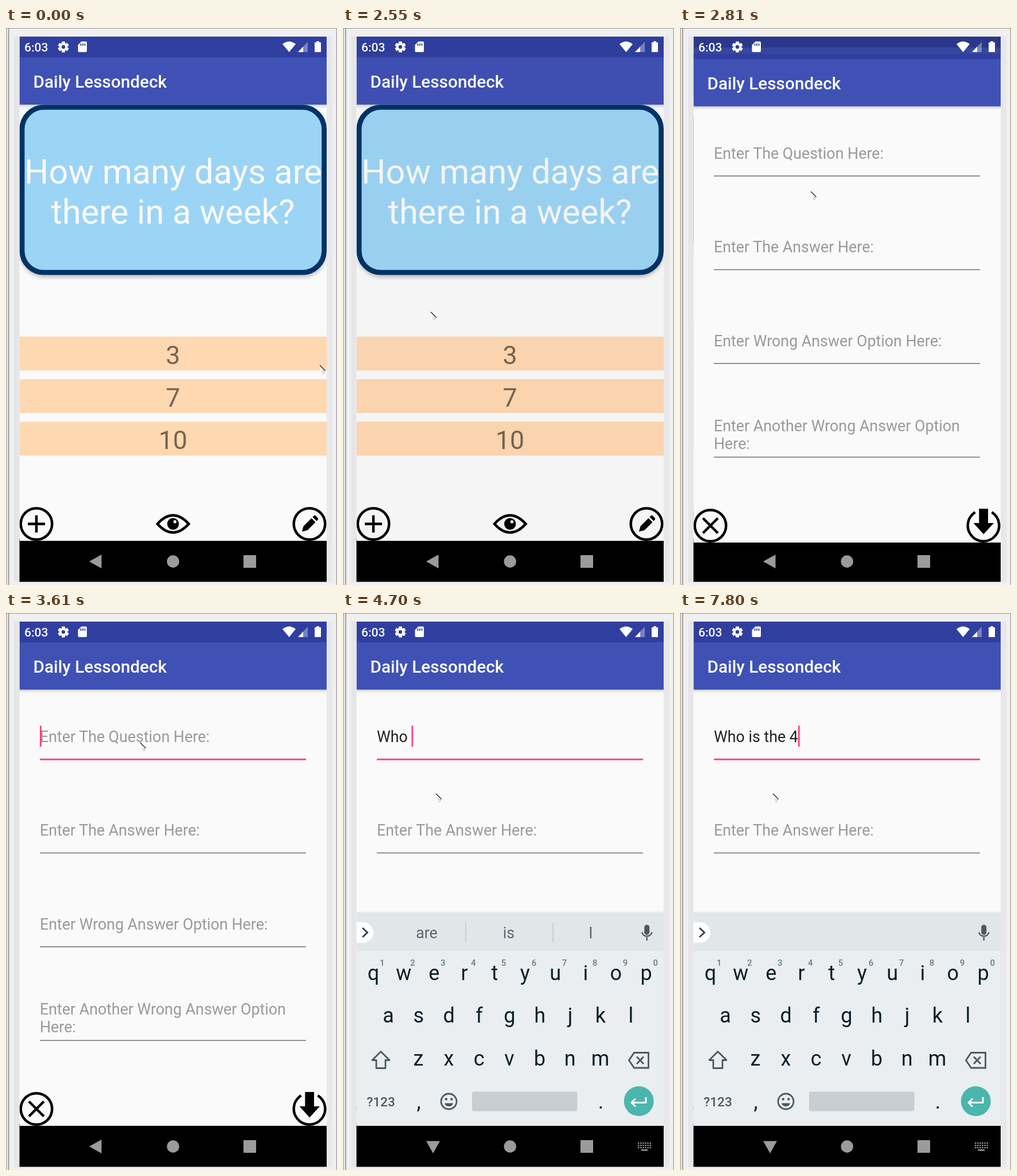
Recreate the animation shown at these times as an HTML page. Size 577x971 px, loop 8000 ms.

```html
<!DOCTYPE html>
<html lang="en">
<head>
<meta charset="utf-8">
<title>Flashcard app</title>
<style>
html, body { margin: 0; width: 100%; height: 100%; overflow: hidden; background: #f0f0f1; }
svg { display: block; font-family: Roboto, "Noto Sans", sans-serif; }
.mid { text-anchor: middle; }
.bold { font-weight: 500; }
.line { fill: none; stroke: #000; stroke-width: 4.5; }
.hint { font-size: 26.8px; fill: #9a9a9a; }
.key { font-size: 36px; fill: #0c1f28; text-anchor: middle; }
.tool { fill: none; stroke: #4b5960; stroke-width: 2.8; }
.word { font-size: 26.8px; fill: #5c686e; text-anchor: middle; }
</style>
</head>
<body>
<svg id="stage" width="577" height="971" viewBox="0 0 577 971"></svg>
<script>
const stage = document.getElementById('stage');
const LOOP = 8000;
const TEXT_X = 59;

const rect = (x, y, w, h, fill, extra = '') =>
  `<rect x="${x}" y="${y}" width="${w}" height="${h}" fill="${fill}" ${extra}/>`;
const text = (x, y, cls, content, extra = '') =>
  `<text x="${x}" y="${y}" class="${cls}" ${extra}>${content}</text>`;
const path = (d, extra = '') => `<path d="${d}" ${extra}/>`;
const ring = (x, y) => `<circle cx="${x}" cy="${y}" r="27.3" class="line" stroke-width="5"/>`;

const header = () =>
  rect(23.5, 134, 535.5, 6, 'url(#shade)') +
  rect(23.5, 15, 535.5, 36, '#303f9f') +
  rect(23.5, 51, 535.5, 82.7, '#3f51b5') +
  text(47.5, 103.5, 'bold', 'Daily Lessondeck', 'font-size="29.75" fill="#fff"');

function cardScreen() {
  const options = ['3', '7', '10'].map((label, i) =>
    rect(23.5, 538 + 74.2 * i, 535.5, 59, '#fed8b1') +
    text(291, 585.5 + 74.2 * i, 'mid', label, 'font-size="44.6" fill="#776451"')).join('');
  return rect(23.5, 15, 535.5, 879, '#fafafa') + header() +
    rect(24, 137, 535, 298, '#000', 'rx="43" opacity=".22" filter="url(#blur)"') +
    rect(28, 138.2, 526.6, 288, '#9cd4f5', 'rx="38" stroke="#036" stroke-width="8.8"') +
    text(291.5, 270.8, 'mid', 'How many days are', 'font-size="59.5" fill="#fafafa"') +
    text(291, 340.5, 'mid', 'there in a week?', 'font-size="59.5" fill="#fafafa"') +
    options + ring(53, 864.5) +
    path('M38 864.5H68M53 849.5V879.5', 'class="line"') +
    path('M264 864.5Q277 849.5 291.2 849.5T318.500 864.500Q305 879.500 291.200 879.500T264 864.500Z', 'class="line"') +
    '<circle cx="291.200" cy="864.500" r="10.200"/><circle cx="294.500" cy="860.800" r="2.700" fill="#fafafa"/>' +
    ring(529, 864.5) +
    path('M516 878L518.500 868.500L532.500 854.500L539.500 861.500L525.500 875.500ZM534.500 852.500L537 850Q538.500 849 540 850.500L543.500 854Q545 855.500 543.500 857.500L541.500 859.500Z');
}

function formScreen() {
  const hints = ['Enter The Question Here:', 'Enter The Answer Here:', 'Enter Wrong Answer Option Here:'];
  const fields = hints.map((label, i) =>
    text(TEXT_X, 225 + 163.4 * i, 'hint', label, i ? '' : 'id="hint"')).join('');
  const rules = [1, 2, 3].map(i => rect(59, 254.2 + 163.4 * i, 464, 1.5, '#707070')).join('');
  return rect(23.5, 15, 535.5, 879, '#fafafa') + header() + fields + rules +
    text(TEXT_X, 699.5, 'hint', 'Enter Another Wrong Answer Option') +
    text(TEXT_X, 731, 'hint', 'Here:') +
    '<rect id="focus" x="59" width="464"/>' +
    text(TEXT_X, 225, '', '', 'id="typed" font-size="26.8" fill="#212121"') +
    rect(59, 196.5, 2.8, 36.5, '#ff4081', 'id="caret"') +
    ring(53, 864.5) + path('M40 851.500L66 877.500M66 851.500L40 877.500', 'class="line"') +
    path('M514.500 841.200A27.300 27.300 0 1 0 543.500 841.200', 'class="line"') +
    path('M521.300 835H537V860H547L529.200 879.500L511.500 860H521.300Z');
}

function keyboard() {
  const row = (letters, x, y) => [...letters].map((c, i) => text(x + 52.85 * i, y, 'key', c)).join('');
  const digits = [...'1234567890'].map((c, i) =>
    text(68.3 + 52.95 * i, 615, 'mid bold', c, 'font-size="15" fill="#6e7a80"')).join('');
  return rect(23.5, 519, 535.5, 5, 'url(#rise)') +
    rect(23.5, 523.5, 535.5, 66, '#e1e6e8') + rect(23.5, 589, 535.5, 305, '#eaeef1') +
    path('M23.500 539H35A18 18 0 0 1 35 575H23.500Z', 'fill="#fff"') +
    path('M34 549L42.500 557L34 565', 'class="tool" style="stroke:#2f3f47"') +
    '<g id="words">' + rect(213.3, 540, 1.4, 34, '#c0c6c9') + rect(365.3, 540, 1.4, 34, '#c0c6c9') +
    [146, 289, 432].map(x => text(x, 567, 'word', '')).join('') + '</g>' +
    rect(525.2, 543.5, 9, 17.5, '#4b5960', 'rx="4.500"') +
    path('M521 556.500A9 9 0 0 0 538.500 556.500M529.700 565V571', 'class="tool" style="stroke-width:2.4"') +
    digits + row('qwertyuiop', 53, 640) + row('asdfghjkl', 79, 714) + row('zxcvbnm', 131.5, 789) +
    path('M66 764.500L81 779.500H74V793.500H58V779.500H51Z', 'class="tool" stroke-linejoin="round"') +
    path('M507.500 766.500H532.500V793H507.500L498.500 779.700ZM512 773.500L524 786M524 773.500L512 786', 'class="tool"') +
    text(66, 859.5, 'mid bold', '?123', 'font-size="22.6" fill="#4b5960"') +
    text(132, 864, 'key', ',') + text(449.5, 864, 'key', '.') +
    '<circle cx="184.500" cy="851.500" r="13.500" class="tool"/>' +
    '<circle cx="179.800" cy="847.500" r="2.200" fill="#4b5960"/><circle cx="189.300" cy="847.500" r="2.200" fill="#4b5960"/>' +
    path('M177 854.500H192A7.800 7.800 0 0 1 177 854.500Z', 'fill="#4b5960"') +
    rect(225, 834.5, 183.5, 34, '#c8cdd1', 'rx="4"') +
    '<circle cx="515.700" cy="851" r="26" fill="#4bb6ac"/>' +
    path('M528 844V853.500H504M510 846.500L503 853.500L510 860.500', 'class="tool" style="stroke:#fff"');
}

function statusIcons() {
  const teeth = [0, 60, 120].map(a => rect(97, 23.5, 6, 19, '#fff', `rx="1" transform="rotate(${a} 100 33)"`)).join('');
  return text(32, 41, 'bold', '6:03', 'font-size="21" fill="#fff"') + teeth +
    '<circle cx="100" cy="33" r="5.200" fill="none" stroke="#fff" stroke-width="4"/><circle cx="100" cy="33" r="3.200" fill="#303f9f"/>' +
    path('M131.500 23.500H139Q141 23.500 141 25.500V40Q141 42 139 42H127.500Q125.500 42 125.500 40V29.500Z', 'fill="#fff"') +
    path('M130.500 27V31M134 27V31M137.500 27V31', 'stroke="#303f9f" stroke-width="1.800"') +
    path('M482 28Q493.500 19 505 28L493.500 42Z', 'fill="#fff"') +
    path('M526 24V42H509Z', 'fill="#fff" opacity=".35"') + path('M518 32.500V42H509Z', 'fill="#fff"') +
    path('M538 25H541.200V23H545.800V25H549V42H538Z', 'fill="#fff"');
}

function navIcons() {
  const dots = [0, 1, 2].flatMap(r => [0, 1, 2, 3, 4, 5].map(c =>
    rect(514 + 4.1 * c, 923 + 4 * r, 2.4, 2.3, '#9b9b9b'))).join('');
  return path('M145 930L166.500 918V942Z', 'id="back" fill="#9b9b9b"') +
    '<circle cx="291.200" cy="930" r="10.700" fill="#9b9b9b"/>' +
    rect(414, 919, 22, 22, '#9b9b9b') +
    `<g id="switcher">${dots}${rect(519.5, 935, 11.5, 2.5, '#9b9b9b')}</g>`;
}

stage.innerHTML = `
<defs>
  <linearGradient id="shade" x2="0" y2="1"><stop stop-color="#000" stop-opacity=".13"/><stop offset="1" stop-color="#000" stop-opacity="0"/></linearGradient>
  <linearGradient id="rise" x2="0" y2="1"><stop stop-color="#000" stop-opacity="0"/><stop offset="1" stop-color="#000" stop-opacity=".1"/></linearGradient>
  <filter id="blur"><feGaussianBlur stdDeviation="3"/></filter>
  <clipPath id="screen"><rect x="23.500" y="15" width="535.500" height="879"/></clipPath>
  <clipPath id="reveal"><rect id="revealBox" x="23.500" width="535.500" height="971"/></clipPath>
</defs>
${rect(0, 0, 577, 971, '#f0f0f1')}
${rect(0, 0, 4, 971, '#e3dfdf')}${rect(0, 0, 1, 971, '#aaa3a3')}${rect(4, 0, 1.4, 971, '#8f8b8b')}
${rect(14, 14, 9.5, 952, '#e6e6e8')}${rect(559, 14, 10, 952, '#e8e8ea')}
${rect(0, 0, 577, 1, '#8e8e8e')}${rect(575.7, 0, 1.3, 971, '#a0a0a0')}
${rect(23.5, 890, 535.5, 75.5, '#000')}
<g clip-path="url(#screen)"><g id="cards">${cardScreen()}${rect(23.5, 15, 535.5, 879, '#000', 'id="dim"')}</g></g>
<g clip-path="url(#reveal)"><g id="form">${formScreen()}</g></g>
<g clip-path="url(#screen)"><g id="keyboard">${keyboard()}</g></g>
${statusIcons()}${navIcons()}
<g id="pointer">
  ${path('M0 1L9 10L6.500 10.500L7.500 14.500L5 15L3 11.500L.500 13Z', 'fill="#fff" opacity=".85"')}
  ${path('M0 0L9.500 9.500', 'stroke="#111" stroke-width="1.100"')}
  ${path('M3.500 10H8.500L6.500 14.500L4 12.500', 'fill="none" stroke="#555" stroke-width="1" stroke-dasharray="1.200 1.200"')}
</g>`;

// Each track holds its value until the next time.
const pointerTrack = [
  [0, 547, 588], [1120, 450, 650], [1240, 270, 745], [1360, 142, 788], [1510, 95, 830],
  [1630, 73, 850], [1780, 62, 857], [2400, 93, 666], [2550, 153, 495], [2670, 192, 378],
  [2810, 228, 285], [2940, 242, 243], [3090, 239, 232], [3210, 234, 226],
  [3880, 195, 275], [4000, 162, 315]
];
// time, card shift, dim, form shift, reveal top
const screenTrack = [
  [0, 0, 0, 0, 971], [2550, 0, .02, 0, 971], [2670, -11, .1, 17, 122],
  [2810, -17, .13, 3, 45], [2940, 0, 0, 0, 0]
];
// time, keyboard shift, turn of the back arrow
const keyboardTrack = [[0, 400, 0], [3730, 240, -35], [3880, 34, -78], [4000, 0, -90]];
// time, text, caret shown, suggestions
const typingTrack = [
  [0, '', false, ''], [3610, '', true, "I,The,I'm"], [4000, '', false, "I,The,I'm"],
  [4430, 'W', true, 'We,W,Was'], [4570, 'Wh', true, 'What,Who,When'],
  [4700, 'Who ', true, 'are,is,I'], [5070, 'Who i', true, 'is,I,in'],
  [5380, 'Who is', true, 'is,I,in'], [5500, 'Who is ', true, 'the,your,interested'],
  [5620, 'Who is th', true, 'the,this,that'], [5740, 'Who is the ', true, 'client,current,person'],
  [6140, 'Who is the ', false, 'client,current,person'], [6260, 'Who is the 4', true, ''],
  [6630, 'Who is the 4t', true, ''], [7030, 'Who is the 4', true, ''],
  [7150, 'Who is the 45', true, ''], [7680, 'Who is the 45', false, ''], [7800, 'Who is the 4', true, '']
];

const at = (track, t) => track.filter(step => step[0] <= t).pop();
const el = id => document.getElementById(id);
const set = (id, attrs) => Object.entries(attrs).forEach(([k, v]) => el(id).setAttribute(k, v));
const show = visible => visible ? 'inline' : 'none';
const ruler = document.createElement('canvas').getContext('2d');
ruler.font = '26.8px Roboto, "Noto Sans", sans-serif';
const wordSlots = [...document.querySelectorAll('#words text')];

function draw(t) {
  const [, px, py] = at(pointerTrack, t);
  set('pointer', { transform: `translate(${px} ${py})` });

  const [, cardShift, dim, formShift, top] = at(screenTrack, t);
  set('cards', { transform: `translate(0 ${cardShift})`, display: show(t < 2940) });
  set('dim', { opacity: dim });
  set('form', { transform: `translate(0 ${formShift})`, display: show(t >= 2670) });
  set('revealBox', { y: top });

  const [, lift, turn] = at(keyboardTrack, t);
  set('keyboard', { transform: `translate(0 ${lift})`, display: show(t >= 3730) });
  set('back', { transform: `rotate(${turn} 157 930)` });
  set('switcher', { display: show(t >= 4000) });

  const [, typed, caret, words] = at(typingTrack, t);
  const focused = t >= 3610;
  set('focus', { y: focused ? 253.8 : 254.2, height: focused ? 2.8 : 1.5, fill: focused ? '#ff4081' : '#707070' });
  set('hint', { display: show(!typed) });
  el('typed').textContent = typed;
  set('caret', { x: TEXT_X + ruler.measureText(typed).width, display: show(caret) });
  set('words', { display: show(words) });
  const list = words.split(',');
  wordSlots.forEach((slot, i) => slot.textContent = list[i] || '');
}

const start = performance.now();
function tick() {
  draw((performance.now() - start) % LOOP);
  requestAnimationFrame(tick);
}
tick();
</script>
</body>
</html>
```
